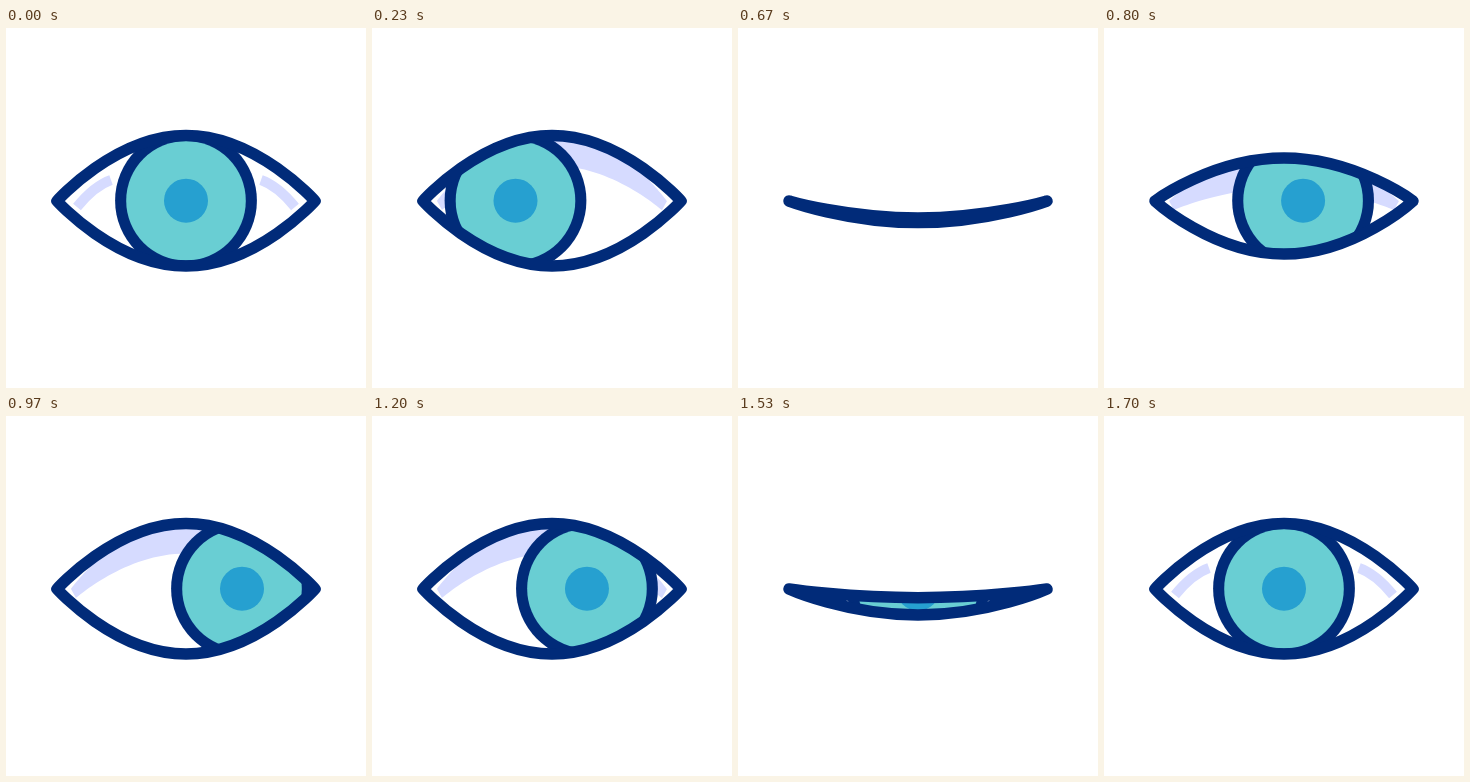
An HTML page with a canvas for the animation above (2000 ms loop, 360x360 px).

```html
<!DOCTYPE html>
<html lang="en">
<head>
<meta charset="utf-8">
<title>Looking eye</title>
<style>
html, body { margin: 0; width: 100%; height: 100%; overflow: hidden; background: #fff; }
canvas { display: block; width: 360px; height: 360px; }
</style>
</head>
<body>
<canvas id="stage"></canvas>
<script>
const canvas = document.getElementById('stage');
const ctx = canvas.getContext('2d');
const dpr = window.devicePixelRatio || 1;
canvas.width = canvas.height = 360 * dpr;

const NAVY = '#012b79', TEAL = '#69ced3', BLUE = '#26a0d0', SHADE = '#d6dbff', GLINT = '#d9e6f3';
const LOOP = 2000, FPS = 30, LAST = 51;
const CX = 180, CY = 173, HALF = 129;
const TOP = 107.4, BOTTOM = 238;

const mix = (a, b, p) => a + (b - a) * p;
const ease = u => u * u * (3 - 2 * u);
const part = (s, from, to) => ease(Math.min(1, Math.max(0, (s - from) / (to - from))));

// Left, across to the right, then back to the middle.
function gazeAt(s) {
  return CX - 73 * part(s, 0, 14) + 129.4 * part(s, 14, 29.5) - 56.4 * part(s, 29.5, 45);
}

const blink = (s, mid) => ease(Math.max(0, 1 - Math.abs(s - mid) / 6.1));
const shutAt = s => blink(s, 20) + blink(s, 44.8);

// Extends the path along a lid; a negative half-width runs right to left.
function arc(half, y, mid) {
  const h = half * 0.55;
  ctx.lineTo(CX - half, y);
  ctx.bezierCurveTo(CX - half, y, CX - h, mid, CX, mid);
  ctx.bezierCurveTo(CX + h, mid, CX + half, y, CX + half, y);
}

function eyePath(top, bottom) {
  ctx.beginPath();
  arc(HALF, CY, top);
  arc(-HALF, CY, bottom);
  ctx.closePath();
}

function disc(x, r, color) {
  ctx.beginPath();
  ctx.arc(x, 172.7, r, 0, Math.PI * 2);
  ctx.fillStyle = color;
  ctx.fill();
}

function lidShade(top) {
  ctx.beginPath();
  arc(HALF - 14, CY, top - 6);
  arc(-110, CY + 9, top + 30);
  ctx.fillStyle = SHADE;
  ctx.fill();
}

// Short strokes either side of the centred iris, flattened with the lids.
function glints(shut) {
  const open = 1 - shut;
  ctx.strokeStyle = shut > 0 ? GLINT : SHADE;
  ctx.lineWidth = 10 * open;
  for (const side of [-1, 1]) {
    ctx.beginPath();
    ctx.moveTo(CX + side * 75, CY - 21 * open);
    ctx.quadraticCurveTo(CX + side * 92, CY - 15 * open, CX + side * 109, CY + 6 * open);
    ctx.stroke();
  }
}

function draw(step) {
  const shut = shutAt(step);
  const x = gazeAt(step);
  const top = mix(TOP, 190, shut), bottom = mix(BOTTOM, 194.6, shut);

  ctx.setTransform(dpr, 0, 0, dpr, 0, 0);
  ctx.fillStyle = '#fff';
  ctx.fillRect(0, 0, 360, 360);

  ctx.save();
  eyePath(top, bottom);
  ctx.clip();
  if (Math.abs(x - CX) < 10) glints(shut);
  else lidShade(top);
  disc(x, 70.9, NAVY);
  disc(x, 59.8, TEAL);
  disc(x, 22, BLUE);
  ctx.restore();

  eyePath(top, bottom);
  ctx.strokeStyle = NAVY;
  ctx.lineWidth = 11.5;
  ctx.lineJoin = 'round';
  ctx.stroke();
}

const start = performance.now();
function tick() {
  const t = (performance.now() - start) % LOOP;
  draw(Math.min(LAST, Math.floor((t + 3.4) * FPS / 1000)));
  requestAnimationFrame(tick);
}
tick();
</script>
</body>
</html>
```
